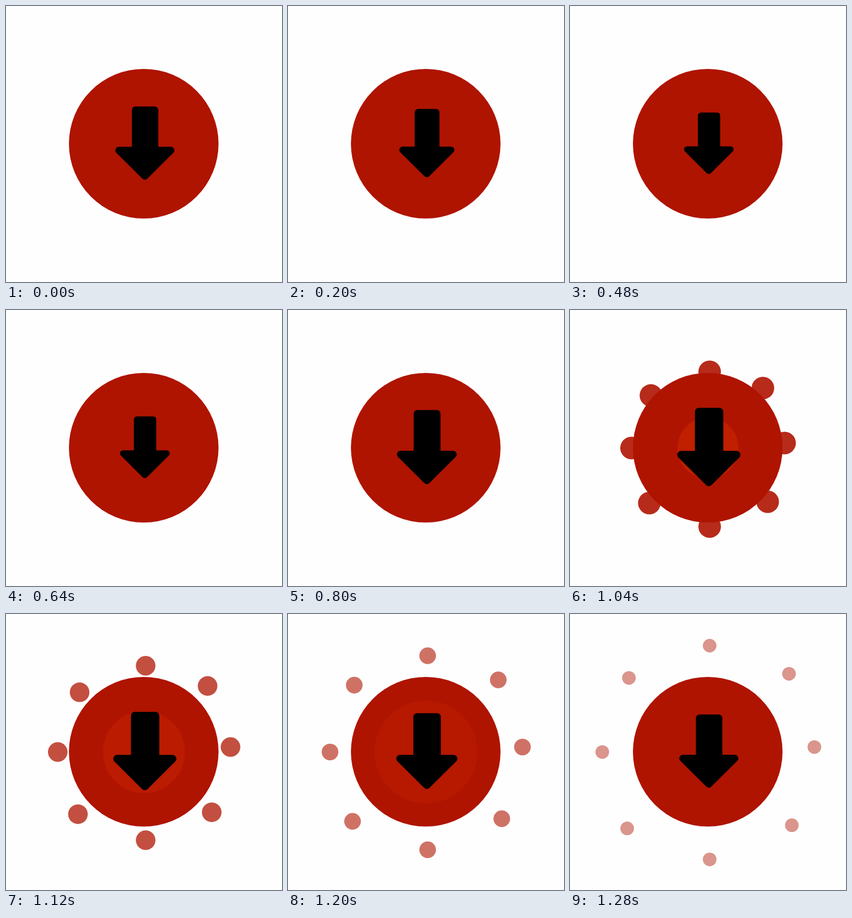
Recreate the animation shown at these times as an HTML page with a canvas. Size 500 by 500 pixels, loop 1320 ms.

```html
<!DOCTYPE html>
<html lang="en">
<head>
<meta charset="utf-8">
<title>Download button</title>
<style>
  html, body { margin: 0; height: 100%; overflow: hidden; background: #fefefe; }
  canvas { display: block; }
</style>
</head>
<body>
<canvas id="stage" width="500" height="500"></canvas>
<script>
const ctx = document.getElementById('stage').getContext('2d');
const LOOP = 1320;
const RED = '#af1400';

// Position at 1120 ms and travel per 160 ms
const dots = [
  [253, 94, 0, -36.4], [365, 130.5, 31.5, -22],
  [406.5, 241, 36, 0], [372.5, 359, 29.2, 23.5],
  [253, 409.5, 0, 34.8], [130.5, 362.5, -26.8, 25.8],
  [94, 250, -35.3, 0], [133.5, 142, -26.6, -26]
];

// Arrow scale as [time, value] keys
const scaleKeys = [[0, 1], [600, 0.8], [856, 1.07], [1120, 1.07], [1280, 1], [LOOP, 1]];

const arrow = new Path2D(
  'M234.5 188.5H269.5V261.5H298.5L251.5 308.2L204.5 261.5H234.5Z');

const clamp = v => Math.min(1, Math.max(0, v));

function keyed(keys, t) {
  const i = keys.findIndex(k => k[0] > t);
  const [t0, a] = keys[i - 1], [t1, b] = keys[i];
  return a + (b - a) * (t - t0) / (t1 - t0);
}

function disc(x, y, r, color, alpha = 1) {
  ctx.globalAlpha = alpha;
  ctx.fillStyle = color;
  ctx.beginPath();
  ctx.arc(x, y, r, 0, Math.PI * 2);
  ctx.fill();
  ctx.globalAlpha = 1;
}

function drawDots(t) {
  if (t < 840) return;
  const step = (t - 1120) / 160;
  const alpha = clamp(0.75 - 0.3 * step);
  for (const [x, y, dx, dy] of dots)
    disc(x + dx * step, y + dy * step, 17.8 - 5.4 * step, RED, alpha);
}

function drawRipple(t) {
  const age = t - 808;
  if (age > 0) disc(250, 250, age * 0.2375, '#d22a00', clamp(1 - age / 472));
}

function drawArrow(t) {
  const s = keyed(scaleKeys, t);
  ctx.save();
  ctx.translate(251.6, 250);
  ctx.scale(s, s);
  ctx.translate(-251.6, -250);
  ctx.fillStyle = ctx.strokeStyle = '#000';
  ctx.lineWidth = 13;
  ctx.lineJoin = 'round';
  ctx.fill(arrow);
  ctx.stroke(arrow);
  ctx.restore();
}

function draw() {
  const t = performance.now() % LOOP;
  ctx.fillStyle = '#fefefe';
  ctx.fillRect(0, 0, 500, 500);
  drawDots(t);
  disc(249.5, 249.5, 135.5, RED);
  drawRipple(t);
  drawArrow(t);
  requestAnimationFrame(draw);
}
draw();
</script>
</body>
</html>
```
